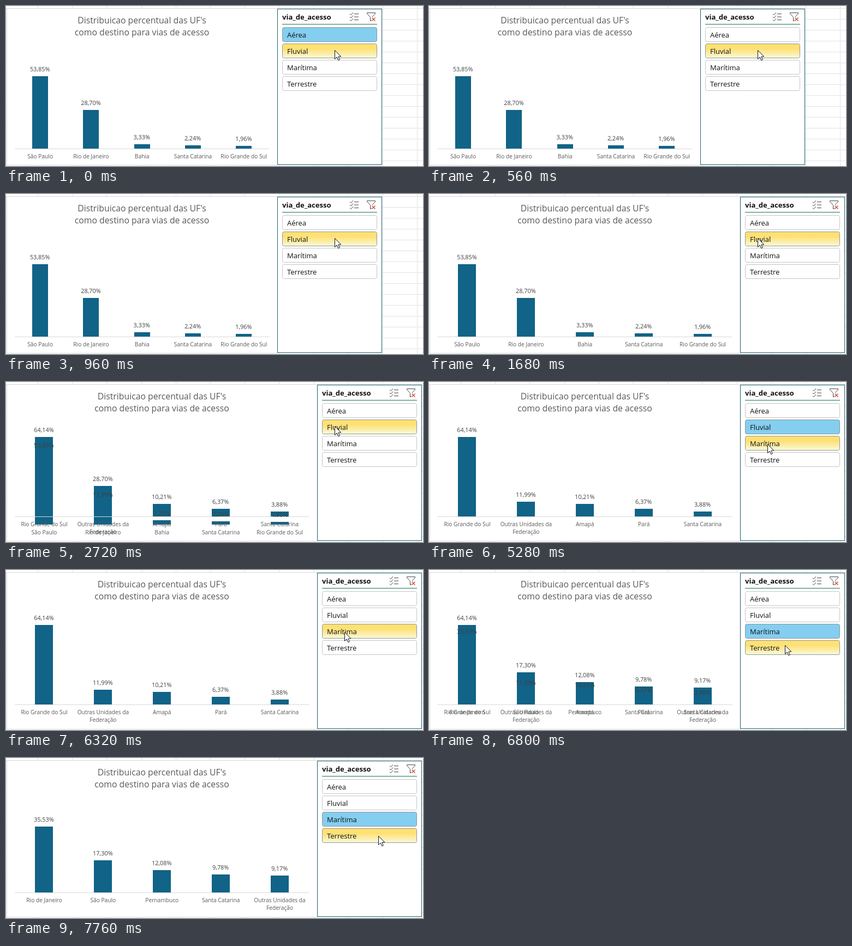
These frames come from a looping animation (764x294 px, 8 s). An HTML page with a canvas:

```html
<!DOCTYPE html>
<html lang="pt">
<head>
<meta charset="utf-8">
<title>Gráfico com segmentação</title>
<style>
  html, body { margin: 0; width: 100%; height: 100%; overflow: hidden; background: #fff; }
  canvas { display: block; width: 764px; height: 294px; }
</style>
</head>
<body>
<canvas id="stage" width="764" height="294"></canvas>
<script>
const ctx = document.getElementById('stage').getContext('2d');
const W = 764, H = 294, LOOP = 8000, STEP = 80;
const FONT = '"Open Sans", "Noto Sans", sans-serif';
const BAR = '#116387', LINE = '#d9d9d9', FRAME = '#1c5f6b';

const LAYOUT = {
  narrow: { right: 497, plot: [16, 482.5], title: 249, bar: 29 },
  wide: { right: 570, plot: [16, 555.5], title: 285.5, bar: 33 }
};

const OTHERS = 'Outras Unidades da|Federação';
const DATA = {
  air: {
    base: 262, scale: 2.47,
    names: ['São Paulo', 'Rio de Janeiro', 'Bahia', 'Santa Catarina', 'Rio Grande do Sul'],
    values: [53.85, 28.70, 3.33, 2.24, 1.96]
  },
  river: {
    base: 247, scale: 2.276,
    names: ['Rio Grande do Sul', OTHERS, 'Amapá', 'Pará', 'Santa Catarina'],
    values: [64.14, 11.99, 10.21, 6.37, 3.88]
  },
  sea: {
    base: 247, scale: 3.41,
    names: ['Rio de Janeiro', 'São Paulo', 'Pernambuco', 'Santa Catarina', OTHERS],
    values: [35.53, 17.30, 12.08, 9.78, 9.17]
  }
};

const ITEMS = ['Aérea', 'Fluvial', 'Marítima', 'Terrestre'];
const ITEM_TOP = 39, ITEM_PITCH = 30, ITEM_H = 27;

// Pointer tip: time, x, y
const PATH = [
  [0, 602, 81], [3120, 602, 81], [3200, 603, 82],
  [4960, 603, 82], [5280, 620, 114],
  [6560, 620, 114], [6800, 652, 138], [7040, 682, 143], [LOOP, 682, 143]
];

function pointerAt(t) {
  const i = PATH.findIndex((p, n) => n > 0 && t <= p[0]);
  const [t0, x0, y0] = PATH[i - 1], [t1, x1, y1] = PATH[i];
  const k = (t - t0) / (t1 - t0);
  return { x: Math.round(x0 + (x1 - x0) * k), y: Math.round(y0 + (y1 - y0) * k) };
}

// Charts overlap for one step whenever the data changes.
function chartsAt(t) {
  if (t < 2720) return ['air'];
  if (t < 2800) return ['air', 'river'];
  if (t < 6800) return ['river'];
  if (t < 6880) return ['river', 'sea'];
  return ['sea'];
}

function selectedAt(t) {
  if (t < 560) return 0;
  return t < 6240 ? 1 : 2;
}

function rect(x, y, w, h, color) {
  ctx.fillStyle = color;
  ctx.fillRect(x, y, w, h);
}

function text(str, x, y, size, color, align = 'center', weight = 500) {
  ctx.font = `${weight} ${size}px ${FONT}`;
  ctx.textAlign = align;
  ctx.fillStyle = color;
  ctx.fillText(str, x, y);
}

function stroke(points, color, width = 1) {
  ctx.beginPath();
  points.forEach(([x, y], i) => i ? ctx.lineTo(x, y) : ctx.moveTo(x, y));
  ctx.strokeStyle = color;
  ctx.lineWidth = width;
  ctx.stroke();
}

function drawSheet() {
  rect(0, 0, W, H, '#fff');
  for (let x = 58; x < W; x += 63.2) rect(Math.round(x), 0, 1, H, '#e3e3e3');
  for (let y = 4; y < H; y += 20) rect(0, y, W, 1, '#e3e3e3');
}

// Calls visit(value, name, centre x, bar top) for each column of a chart.
function eachColumn({ base, scale, names, values }, layout, visit) {
  const [left, right] = layout.plot, pitch = (right - left) / 5;
  values.forEach((v, i) =>
    visit(v, names[i], left + pitch * (i + 0.5), Math.round(base - v * scale)));
}

function drawBars(data, layout) {
  eachColumn(data, layout, (v, name, x, top) =>
    rect(Math.round(x - layout.bar / 2), top, layout.bar, data.base - top, BAR));
}

function drawLabels(data, layout) {
  eachColumn(data, layout, (v, name, x, top) => {
    text(v.toFixed(2).replace('.', ',') + '%', x - 0.5, top - 9.5, 10.9, '#404040');
    name.split('|').forEach((line, n) =>
      text(line, x, data.base + 18 + n * 14, 10.2, '#595959'));
  });
}

function drawChart(charts, layout) {
  rect(1, 4, layout.right - 1, 289, LINE);
  rect(2, 5, layout.right - 2, 287, '#fff');
  text("Distribuicao percentual das UF's", layout.title, 32, 15.8, '#595959');
  text('como destino para vias de acesso', layout.title, 54, 15.8, '#595959');
  charts.forEach(c => drawBars(c, layout));
  const [left, right] = layout.plot;
  rect(left, charts[charts.length - 1].base, right - left, 1, LINE);
  charts.forEach(c => drawLabels(c, layout));
}

function drawIcons(x) {
  for (let i = 0; i < 3; i++) {
    const y = 14.5 + i * 5.5;
    stroke([[x + 133, y], [x + 135, y + 2], [x + 139, y - 2.5]], '#444');
    stroke([[x + 141, y], [x + 149, y]], '#444');
  }
  stroke([[x + 164.5, 12.5], [x + 179.5, 12.5], [x + 179.5, 14], [x + 174, 20]], '#444');
  stroke([[x + 164.5, 12.5], [x + 164.5, 14], [x + 170.5, 20.5], [x + 170.5, 27.5],
          [x + 173, 26]], '#444');
  stroke([[x + 173.5, 21.5], [x + 179.5, 27.5]], '#d8402f', 1.2);
  stroke([[x + 179.5, 21.5], [x + 173.5, 27.5]], '#d8402f', 1.2);
}

function drawItem(label, x, y, hover, selected) {
  ctx.beginPath();
  ctx.roundRect(x + 0.5, y + 0.5, 173, ITEM_H - 1, 3);
  let fill = selected ? '#84cef0' : '#fff';
  if (hover) {
    fill = ctx.createLinearGradient(0, y, 0, y + ITEM_H);
    fill.addColorStop(0, '#ffe270');
    fill.addColorStop(0.35, '#ffe075');
    fill.addColorStop(1, '#f8fbdc');
  }
  ctx.fillStyle = fill;
  ctx.fill();
  ctx.strokeStyle = hover || selected ? '#8f9699' : '#c4c4c4';
  ctx.lineWidth = 1;
  ctx.stroke();
  text(label, x + 9, y + 19, 13, '#111', 'left');
}

function drawSlicer(x, pointer, selected) {
  rect(x, 5, 192, 287, FRAME);
  rect(x + 1, 6, 190, 285, '#fff');
  text('via_de_acesso', x + 9, 25, 13.1, '#111', 'left', 700);
  rect(x + 9, 33, 174, 1, '#1d7050');
  drawIcons(x);
  const over = Math.floor((pointer.y - ITEM_TOP) / ITEM_PITCH);
  ITEMS.forEach((label, i) =>
    drawItem(label, x + 9, ITEM_TOP + i * ITEM_PITCH, i === over, i === selected));
}

function drawPointer({ x, y }) {
  const shape = [[0, 0], [0, 16], [3.7, 12.5], [6.3, 18.3], [8.8, 17.2], [6.3, 11.6], [11.3, 11.4]];
  ctx.beginPath();
  shape.forEach(([px, py]) => ctx.lineTo(x + 0.5 + px, y + 0.5 + py));
  ctx.closePath();
  ctx.fillStyle = '#fff';
  ctx.fill();
  ctx.strokeStyle = '#111';
  ctx.lineWidth = 1;
  ctx.stroke();
}

function draw(now) {
  const t = Math.floor((now % LOOP) / STEP) * STEP;
  const layout = t < 1440 ? LAYOUT.narrow : LAYOUT.wide;
  const pointer = pointerAt(t);
  drawSheet();
  drawChart(chartsAt(t).map(name => DATA[name]), layout);
  drawSlicer(layout.right, pointer, selectedAt(t));
  drawPointer(pointer);
}

const start = performance.now();
function tick() {
  draw(performance.now() - start);
  requestAnimationFrame(tick);
}
tick();
</script>
</body>
</html>
```
